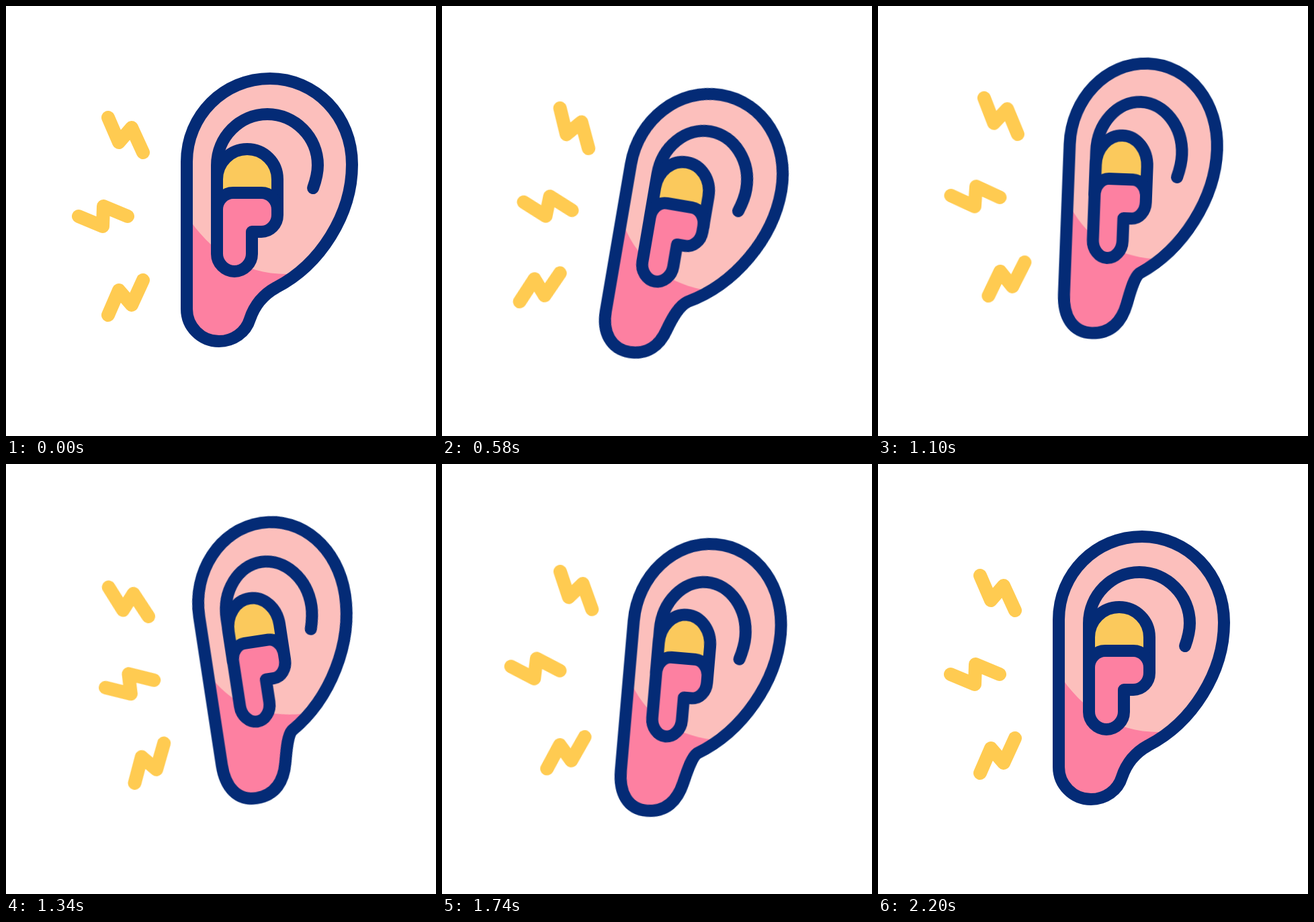
An HTML page without scripts for the animation above (2400 ms loop, 640x640 px).

```html
<!DOCTYPE html>
<html lang="en">
<head>
<meta charset="utf-8">
<title>Ringing ear</title>
<style>
  html, body { margin: 0; width: 100%; height: 100%; overflow: hidden; background: #fff; }
  svg { display: block; width: 100%; height: 100%; }
  path { stroke-linecap: round; stroke-linejoin: round; }

  .bob, .tilt, .bolt, .soft {
    animation: 2.4s cubic-bezier(.37, 0, .63, 1) infinite;
  }
  .bob { animation-name: bob; }
  .tilt { animation-name: tilt; transform-origin: 390px 224px; }
  .bolt { animation-name: shake; animation-delay: var(--wait); fill: none; stroke: #ffcb51; stroke-width: 20; }
  .soft { animation-name: squeeze; d: var(--rest); }

  .line { fill: none; stroke: #042b76; stroke-width: 18; }
  .skin { fill: #fcbfbc; }
  .pink { fill: #fd80a1; }
  .dome { fill: #fbc95c; }

  .ear {
    --rest: path("M269 451 V232 C269 163 324 108 393 108 C460 108 515 163 515 236 C515 310 468 385 402 419 C382 430 370 445 363 466 C357 486 338 499 317 499 C290 499 269 477 269 451 Z");
    --slim: path("M285.5 453 V230 C285.5 162 335.5 105.5 397.5 105.5 C459.5 105.5 505 160 505 230 C505 302 460.5 380 396.5 418 C388.5 425 384 446 379.5 464 C373 491 358 509 329.5 509.5 C300.5 509.5 285.5 487 285.5 453 Z");
  }
  .shade {
    --rest: path("M269 312 C303 364 352 399 418 399 L402 419 C382 430 370 445 363 466 C357 486 338 499 317 499 C290 499 269 477 269 451 Z");
    --slim: path("M285.5 315 C312 364 352 393 420 396 L396.5 418 C388.5 425 384 446 379.5 464 C373 491 358 509 329.5 509.5 C300.5 509.5 285.5 487 285.5 453 Z");
  }
  .fold {
    --rest: path("M457 271 C461 260 464 249 464 237 C464 195 430 161 389 161 C348 161 314 195 314 237 V300");
    --slim: path("M447 273 C450.4 262 453 251 453 239 C453 197 424 163 389 163 C354.3 163 325.4 197 325.4 239 V302");
  }
  .cap {
    --rest: path("M314 303 V258 C314 233 334 213 359 213 C384 213 404 233 404 258 V303");
    --slim: path("M325.4 304 V259 C325.4 234 342.4 214 363.7 214 C385 214 402 234 402 259 V304");
  }
  .plug {
    --rest: path("M314 303 C314 289 325 278 338 278 H380 C393 278 404 289 404 303 V311 C404 325 393 336 380 336 H366 V369 C366 383 354 395 340 395 C326 395 314 383 314 369 Z");
    --slim: path("M325.4 304 C325.4 290 334.8 279 345.8 279 H381.5 C392.6 279 402 290 402 304 V312 C402 326 392.6 337 381.5 337 H369.6 V371 C369.6 385 359.4 397 347.5 397 C335.6 397 325.4 385 325.4 371 Z");
  }

  @keyframes bob {
    0%, 8.333%, 91.667%, 100% { transform: translateY(0); }
    29.167% { transform: translateY(27px); }
    50% { transform: translateY(-25px); }
    70.833% { transform: translateY(13px); }
  }
  @keyframes tilt {
    0%, 8.333%, 91.667%, 100% { transform: rotate(0deg); }
    33.333% { transform: rotate(13.7deg); }
    58.333% { transform: rotate(-9.2deg); }
    75% { transform: rotate(5.7deg); }
  }
  @keyframes shake {
    0%, 33.333%, 66.667%, 100% { transform: translateX(0); }
    16.667%, 50% { transform: translateX(25px); }
  }
  @keyframes squeeze {
    0%, 8.333%, 91.667%, 100% { d: var(--rest); }
    33.333%, 75% { d: var(--slim); }
  }
</style>
</head>
<body>
<svg viewBox="0 0 640 640">
  <g class="bob">
    <g class="tilt">
      <path class="bolt" style="--wait:.4s" d="M152 166 L168 203 L187 181 L204 218"/>
      <path class="bolt" style="--wait:.2s" d="M108 313 L144 328 L145 298 L181 313"/>
      <path class="bolt" style="--wait:.6s" d="M152 460 L168 423 L187 445 L204 408"/>

      <path class="soft ear skin"/>
      <path class="soft shade pink"/>
      <path class="soft ear line"/>
      <path class="soft fold line"/>
      <path class="soft cap line dome"/>
      <path class="soft plug line pink"/>
    </g>
  </g>
</svg>
</body>
</html>
```
